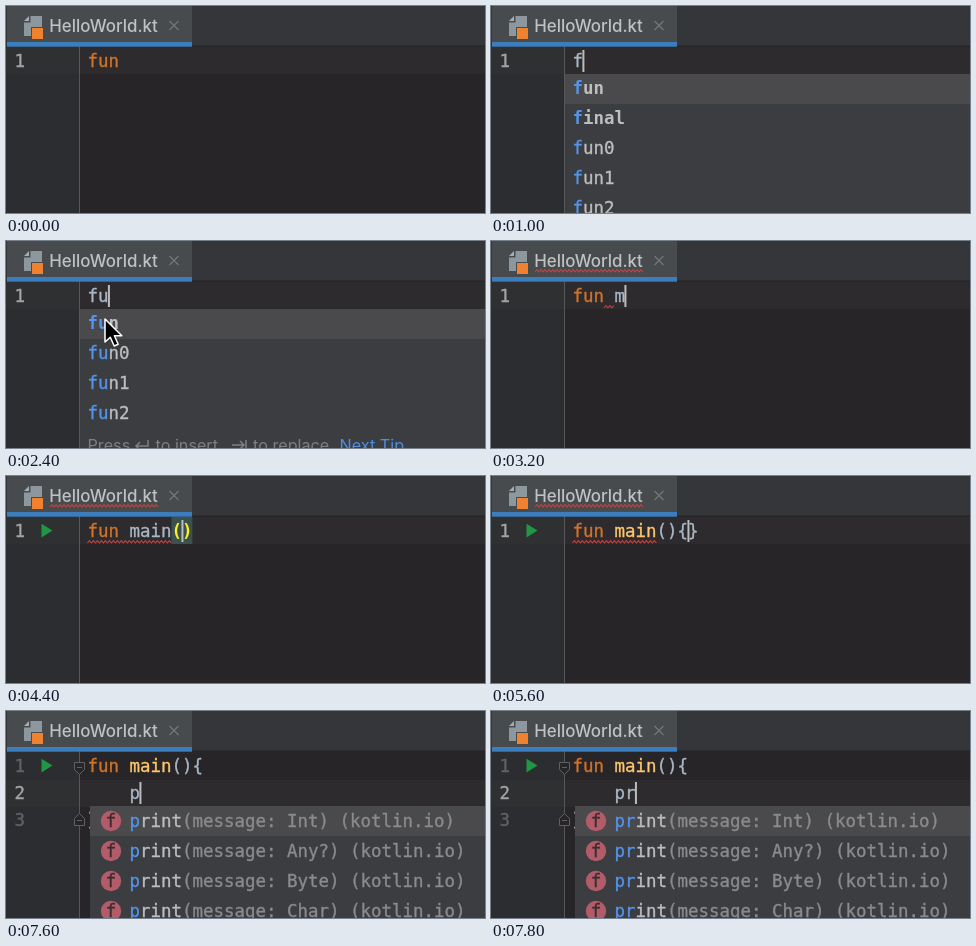
These frames come from a looping animation (479x207 px, 8 s). An HTML page:

```html
<!DOCTYPE html>
<html lang="en">
<head>
<meta charset="utf-8">
<title>Typing in an editor</title>
<style>
  html, body { margin: 0; width: 100%; height: 100%; overflow: hidden; background: #272528; }
  svg { display: block; width: 479px; height: 207px; }
  text { white-space: pre; stroke-width: 0; }
  text, tspan { fill: currentColor; stroke: currentColor; }
  .code { font: 17.45px "DejaVu Sans Mono", monospace; stroke-width: .35px; }
  .bold { font-weight: 700; stroke-width: 0; }
  .tab { font: 500 16.9px Inter, sans-serif; }
  .hint { font: 16.2px Inter, sans-serif; }
</style>
</head>
<body>
<svg viewBox="0 0 479 207">
  <rect width="479" height="207" fill="#272528"/>
  <rect width="73" height="207" fill="#2c2d30"/>
  <rect width="479" height="40" fill="#343639"/>
  <rect y="39" width="479" height="1" fill="#2c2d2f"/>
  <rect x="1" width="185" height="37" fill="#484b4e"/>
  <path d="M24.500 10H36V21H25V30H18V16.500H24.500z" fill="#8d979e"/>
  <path d="M18 15l5-5v5z" fill="#a5adb3"/>
  <rect x="26" y="22" width="11" height="11" fill="#f0812f"/>
  <text class="tab" x="43.300" y="25.700" color="#bfc1c3">HelloWorld.kt</text>
  <path d="M163.500 15l9 9m0-9l-9 9" stroke="#74777a" stroke-width="1.200"/>
  <g id="scene"></g>
  <rect x="1" y="36" width="185" height="4.700" fill="#3c7ebd"/>
</svg>
<script>
const LOOP = 8000, X0 = 81.4, CW = 10.505, LINE = 27;
const scene = document.getElementById('scene');

const C = {
  plain: '#a9b7c6', key: '#d0742b', name: '#ffc66d', match: '#5394ec',
  item: '#bcbec0', dim: '#8a8b8d', error: '#c9423f', brace: '#ffef28'
};

// Each step changes only the properties it lists.
const steps = [
  [0, { code: 'fun', caret: null, body: null, list: null, mouse: null }],
  [200, { code: 'f', caret: 1 }],
  [400, { code: '', caret: 0 }],
  [1000, { code: 'f', caret: 1, list: 'words' }],
  [1200, { code: 'fu', caret: 2 }],
  [1400, { titleError: true }],
  [1600, { mouse: [172, 150] }],
  [1800, { mouse: [130, 112] }],
  [2000, { mouse: [106, 86] }],
  [2200, { mouse: [99, 78], titleError: false }],
  [2600, { code: 'fun', caret: 3, list: null }],
  [2800, { titleError: true }],
  [3000, { code: 'fun ', caret: 4, mouse: null, squiggle: [3, 4] }],
  [3200, { code: 'fun m', caret: 5 }],
  [3400, { code: 'fun ma', caret: 6 }],
  [3600, { code: 'fun mai', caret: 7 }],
  [3800, { code: 'fun main', caret: 8 }],
  [4000, { code: 'fun main()', caret: 9, pair: true }],
  [4200, { squiggle: [0, 8], run: true }],
  [4600, { caret: 10, titleError: false, squiggle: null }],
  [5000, { titleError: true, squiggle: [0, 8], named: true }],
  [5400, { code: 'fun main(){', caret: 11, pair: false }],
  [5600, { code: 'fun main(){}' }],
  [5800, { squiggle: null }],
  [6000, { titleError: false }],
  [6600, { code: 'fun main(){', body: '', caret: 4 }],
  [7000, { fold: true }],
  [7400, { body: 'p', caret: 5 }],
  [7600, { list: 'calls' }],
  [7800, { body: 'pr', caret: 6 }]
];

const col = n => X0 + n * CW;
const baseline = row => 61 + row * LINE;
const rect = (x, y, w, h, fill) => `<rect x="${x}" y="${y}" width="${w}" height="${h}" fill="${fill}"/>`;
const text = (x, y, s, color, cls = 'code') => `<text class="${cls}" x="${x}" y="${y}" color="${color}">${s}</text>`;

function wave(x1, x2, y) {
  let d = `M${x1} ${y}`;
  for (let x = x1 + 2, up = true; x <= x2; x += 2, up = !up) d += `L${x} ${up ? y - 2.4 : y}`;
  return `<path d="${d}" fill="none" stroke="${C.error}" stroke-width="1.1"/>`;
}

function firstLine(s) {
  const isKey = s.code.startsWith('fun');
  const head = isKey ? 'fun' : s.code;
  const name = s.code.slice(4, 8), tail = s.code.slice(8);
  let out = s.pair ? rect(col(8), 41, CW * 2, 27, '#3b514d') : '';
  out += text(col(0), 61, head, isKey ? C.key : C.plain);
  out += text(col(4), 61, name, s.named ? C.name : C.plain);
  out += text(col(8), 61, tail, s.pair ? C.brace : C.plain, s.pair ? 'code bold' : 'code');
  if (s.squiggle) out += wave(col(s.squiggle[0]), col(s.squiggle[1]), 67);
  return out;
}

function gutter(s, row) {
  let out = '';
  for (let i = 0; i < (s.body === null ? 1 : 3); i++)
    out += text(8.5, baseline(i) + 0.4, i + 1, i === row ? '#a4a5a7' : '#606366');
  if (s.run) out += '<path d="M35.500 47.800L46.500 54.600L35.500 61.400z" fill="#219645"/>';
  return out;
}

function fold(y, dir) {
  return `<g transform="translate(73.5 ${y}) scale(1 ${dir})" fill="#272528" stroke="#606163">` +
    '<path d="M-5-6H5V1L0 6L-5 1z"/><path d="M-2.500-1H2.500"/></g>';
}

function panel(x, y) {
  return rect(x, y, 479 - x, 207 - y, '#3c3d40') + rect(x, y, 479 - x, 30, '#4a4a4d');
}

function entry(x, y, word, typed, cls) {
  return text(x, y, `<tspan color="${C.match}">${word.slice(0, typed)}</tspan>${word.slice(typed)}`, C.item, cls);
}

function words(s) {
  const all = ['fun', 'final', 'fun0', 'fun1', 'fun2'].filter(w => w.startsWith(s.code));
  let out = panel(74, 68);
  all.forEach((w, i) => out += entry(X0, 88 + i * 30, w, s.code.length, /\d/.test(w) ? 'code' : 'code bold'));
  return all.length < 5 ? out + hint() : out;
}

function hint() {
  const y = 210, grey = '#7d7f82';
  return text(81.5, y, 'Press', grey, 'hint') + text(149.5, y, 'to insert,', grey, 'hint') +
    text(247, y, 'to replace', grey, 'hint') + text(333.5, y, 'Next Tip', '#4b8fe0', 'hint') +
    `<path d="M142 199v6h-12m4-4l-4 4l4 4M226 204h12m-4-4l4 4l-4 4M240 199v10" fill="none" stroke="${grey}" stroke-width="1.5"/>`;
}

function calls(s) {
  let out = panel(84, 95);
  ['Int', 'Any?', 'Byte', 'Char'].forEach((type, i) => {
    const y = 110 + i * 30;
    out += `<circle cx="105" cy="${y}" r="10.2" fill="#b25c69"/>`;
    out += text(105 - CW / 2, y + 5.5, 'f', '#3b2d31');
    out += entry(col(4), y + 5.5, 'print', s.body.length);
    out += text(col(9), y + 5.5, `(message: ${type}) (kotlin.io)`, C.dim);
  });
  return out;
}

function pointer([x, y]) {
  return `<path transform="translate(${x} ${y})" d="M0 0V23L5.300 18.200L9.200 27L13.200 25.200L9.400 16.700H16.800z" ` +
    'fill="#000" stroke="#fff" stroke-width="1.5" stroke-linejoin="round"/>';
}

function draw(s) {
  const row = s.body === null ? 0 : 1;
  let out = rect(0, 41 + row * 28, 479, 27, '#2d2b2e') + rect(0, 41 + row * 28, 73, 27, '#2f3032');
  out += rect(73, 40, 1, 167, '#555759') + gutter(s, row) + firstLine(s);
  if (s.titleError) out += wave(44, 152, 31);
  if (row) out += text(col(4), 88, s.body, C.plain) + text(col(0), 115, '}', C.plain);
  if (s.fold) out += fold(57.5, 1) + fold(108.5, -1);
  if (s.list) out += s.list === 'words' ? words(s) : calls(s);
  if (s.caret !== null) out += rect(col(s.caret) - 0.5, 44 + row * LINE, 2, 22, '#bbbcbd');
  if (s.mouse) out += pointer(s.mouse);
  scene.innerHTML = out;
}

let shown = -1;
function tick() {
  const t = performance.now() % LOOP;
  const now = steps.filter(([at]) => at <= t).length;
  if (now !== shown) {
    shown = now;
    draw(Object.assign({}, ...steps.slice(0, now).map(step => step[1])));
  }
  requestAnimationFrame(tick);
}
tick();
</script>
</body>
</html>
```
